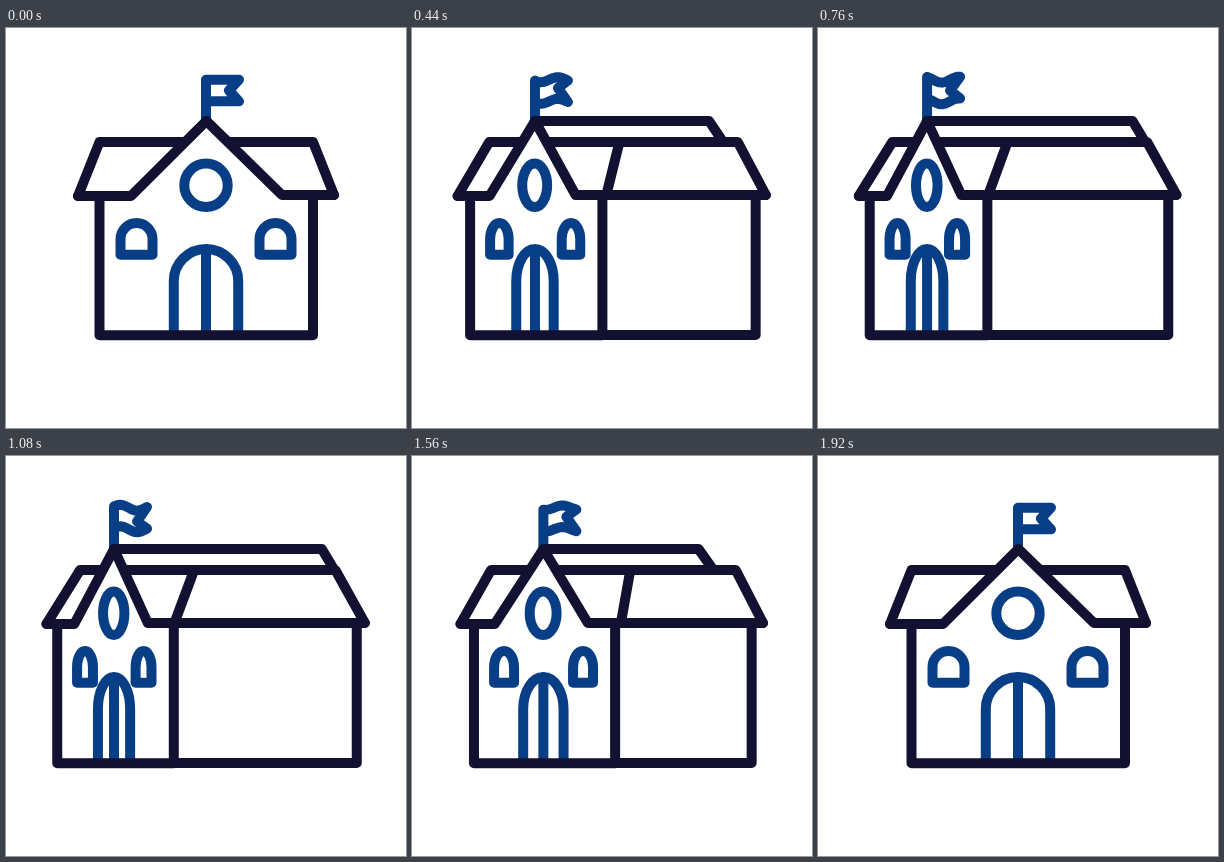
Animation of 400x400 px, one loop 2 s. Source, as an HTML page:

```html
<!DOCTYPE html>
<html lang="en">
<head>
<meta charset="utf-8">
<title>School building</title>
<style>
  html, body { margin: 0; width: 100%; height: 100%; overflow: hidden; background: #fff; }
  svg { display: block; width: 100%; height: 100%; }
  path { fill: none; stroke-width: 10; stroke-linecap: round; stroke-linejoin: round; }
  .navy { stroke: #131131; }
  .blue { stroke: #083e86; }
  .mask { fill: #fff; stroke: none; }
</style>
</head>
<body>
<svg viewBox="0 0 400 400">
  <path id="flag" class="blue"/>
  <path id="roof" class="navy"/>
  <path id="gable" class="mask"/>
  <path id="details" class="blue"/>
  <path id="walls" class="navy"/>
</svg>
<script>
const LOOP = 2000, STEP = 40, HALF = 960;
const draw = (id, d) => document.getElementById(id).setAttribute('d', d);
const line = (...points) => 'M' + points.map(p => p.map(v => v.toFixed(2)).join(' ')).join('L');

// Cubic bezier timing (.35, 0, 0, 1)
function ease(x) {
  let lo = 0, hi = 1;
  for (let i = 0; i < 24; i++) {
    const u = (lo + hi) / 2;
    if (1.05 * (1 - u) ** 2 * u + u ** 3 < x) lo = u; else hi = u;
  }
  return lo * lo * (3 - 2 * lo);
}

function arch(x, r, ry, spring, bottom) {
  return `M${x - r} ${bottom}V${spring}A${r} ${ry} 0 0 1 ${x + r} ${spring}V${bottom}`;
}

function flag(x, turn, t) {
  const crest = 11 + 0.027 * t;
  const wave = (dx, y) => [x + dx, y - 3 * turn * Math.cos(2 * Math.PI * (dx - crest) / 34)];
  const edge = y => Array.from({ length: 12 }, (_, i) => wave(i * 3, y));
  const outline = [...edge(51.7), wave(23, 62.5), ...edge(73.3).reverse()];
  return line([x, 93], wave(0, 51.7)) + line(...outline);
}

function render(t) {
  const turn = ease(Math.max(0, 1 - Math.abs(t - HALF) / HALF));
  const mix = (a, b) => a + (b - a) * turn;

  const left = mix(93.5, 51), corner = mix(307, 167), right = mix(307, 351);
  const apex = mix(200.3, 107.5), eave = mix(72, 40.3), farEave = mix(328, 359);
  const footL = mix(125, 68), footR = mix(276, 141);
  const topL = mix(93.5, 74), topR = mix(307, 329.5);

  draw('flag', flag(mix(200, 107.5), turn, t));
  draw('roof',
    line([eave, 168], [topL, 114], [topR, 114], [farEave, 167]) +
    line([apex, 93], [mix(200.3, 316.5), 93], [mix(222, 329), 114]) +
    line([mix(307, 187.5), 114], [mix(328, 167.5), 167]));
  draw('gable', line([footL, 168], [apex, 93], [footR, 167]) + 'Z');

  const cx = mix(200, 107.2), r = mix(21.7, 10.6), pane = mix(16, 7.9);
  const door = mix(200, 107.5);
  draw('details',
    `M${cx - r} 157.3a${r} 21.7 0 1 1 ${2 * r} 0a${r} 21.7 0 1 1 ${-2 * r} 0Z` +
    arch(mix(130.5, 78.7), pane, 16, 211, 226.8) + 'Z' +
    arch(mix(269.5, 136.8), pane, 16, 211, 226.8) + 'Z' +
    arch(door, mix(32.2, 16), 32, 253, 303) +
    line([door, 221], [door, 303]));

  draw('walls',
    line([eave, 168], [footL, 168], [apex, 93], [footR, 167], [farEave, 167]) +
    line([left, 168], [left, 307.3], [corner, 307.3], [corner, 167]) +
    line([corner, 306.9], [right, 306.9], [right, 167]));
}

const start = performance.now();
function tick() {
  const t = (performance.now() - start) % LOOP;
  render(Math.floor(t / STEP) * STEP);
  requestAnimationFrame(tick);
}
tick();
</script>
</body>
</html>
```
